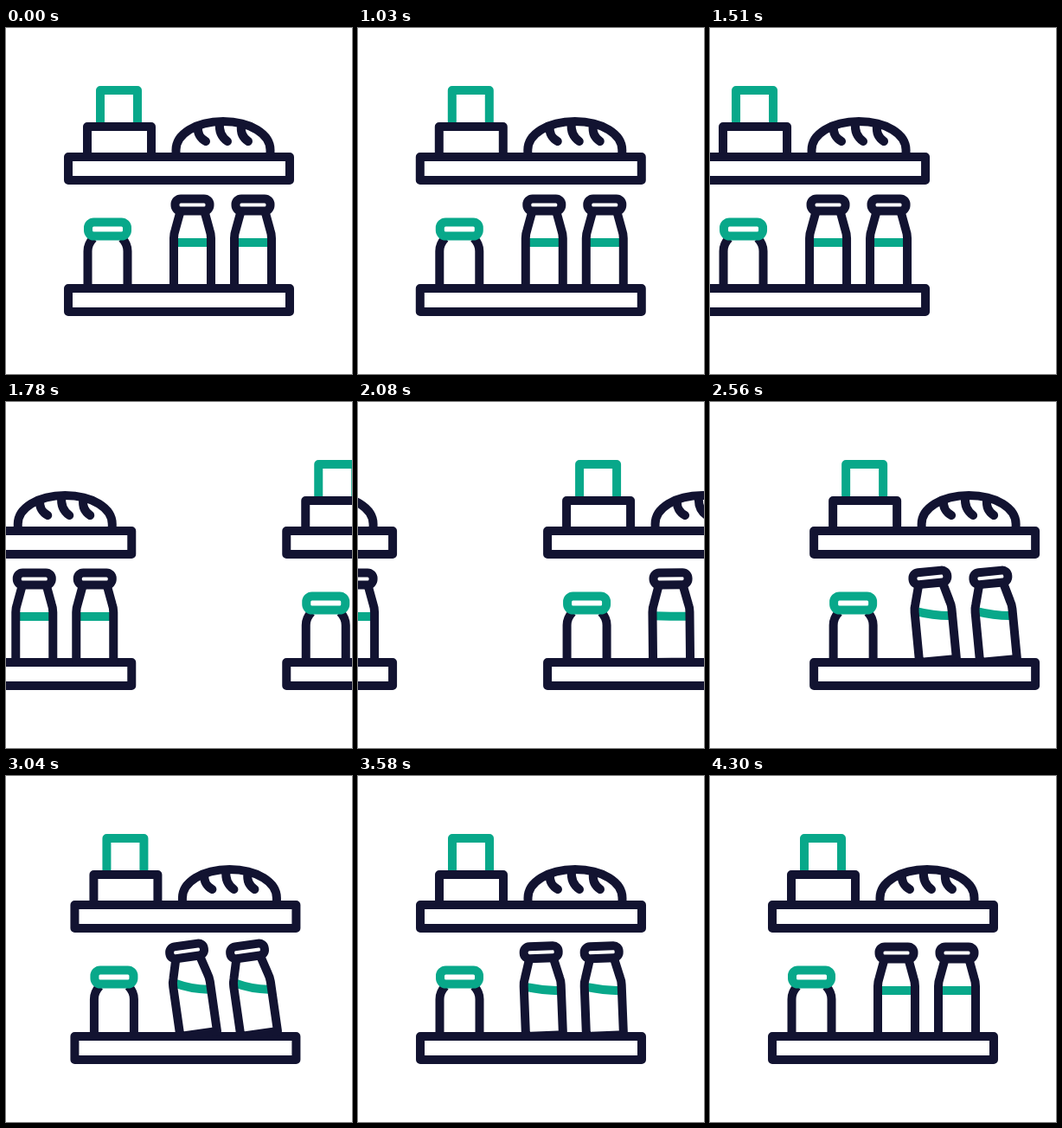
These frames come from a looping animation (400 by 400 pixels, 4.36 s). An HTML page:

```html
<!DOCTYPE html>
<html lang="en">
<head>
<meta charset="utf-8">
<title>Shelf</title>
<style>
  html, body { margin: 0; width: 100%; height: 100%; overflow: hidden; background: #fff; }
  svg { display: block; width: 100%; height: 100%; }
</style>
</head>
<body>
<svg viewBox="0 0 400 400" fill="none" stroke="#121331" stroke-width="10" stroke-linejoin="round">
  <defs>
    <g id="goods">
      <path d="M109 109V72H152V109" stroke="#08a88a"/>
      <path d="M94 149V114H168V149"/>
      <path d="M196.5 149V141C196.5 123 219 108 251 108S305.500 123 305.500 141V149"/>
      <path d="M222 114C221 122 225 128 231 131M247 110C246 119 249 126 256 131M272 113C271 121 274 127 280 131" stroke-linecap="round"/>
      <rect x="72" y="149" width="256" height="27"/>
      <path d="M101 243C97 247 94.500 252 94.500 258V301M134 243C138 247 140.500 252 140.500 258V301"/>
      <rect x="95" y="224.500" width="45" height="16" rx="6.500" stroke="#08a88a"/>
      <rect x="72" y="301" width="256" height="27"/>
    </g>
    <g id="glass">
      <path d="M201 214L195.500 234Q194 238 194 243V301H237V243Q237 238 235.500 234L230 214"/>
      <rect x="195.500" y="197.500" width="40" height="14" rx="6.500"/>
    </g>
  </defs>
</svg>
<script>
const svg = document.querySelector('svg');
const LOOP = 4360, START = 1030, STEP = 30, SPAN = 435;

function add(parent, tag, attrs = {}) {
  const el = document.createElementNS('http://www.w3.org/2000/svg', tag);
  for (const k in attrs) el.setAttribute(k, attrs[k]);
  return parent.appendChild(el);
}

function makeShelf() {
  const root = add(svg, 'g');
  add(root, 'use', { href: '#goods' });
  const bottles = [0, 70].map(dx => {
    const body = add(add(root, 'g', { transform: `translate(${dx})` }), 'g');
    const milk = add(body, 'path', { stroke: '#08a88a' });
    add(body, 'use', { href: '#glass' });
    return { body, milk };
  });
  return { root, bottles };
}

function pose({ root, bottles }, x, angle, slosh) {
  root.setAttribute('transform', `translate(${x.toFixed(3)})`);
  const left = 248 - 9 * slosh, right = 248 + 4 * slosh, mid = 248 + 1.5 * slosh;
  for (const { body, milk } of bottles) {
    body.setAttribute('transform', `rotate(${-angle} 194 301)`);
    milk.setAttribute('d', `M196 ${left}Q215.500 ${mid} 235 ${right}`);
  }
}

// Eased progress from a to b, with flat ends and handle positions x1, x2
function ease(t, a, b, x1, x2) {
  const x = Math.min(1, Math.max(0, (t - a) / (b - a)));
  if (x === 0 || x === 1) return x;
  let lo = 0, hi = 1;
  for (let i = 0; i < 30; i++) {
    const s = (lo + hi) / 2, r = 1 - s;
    if (3 * r * r * s * x1 + 3 * r * s * s * x2 + s * s * s < x) lo = s; else hi = s;
  }
  return lo * lo * (3 - 2 * lo);
}

const leaving = makeShelf(), arriving = makeShelf();

function draw(time) {
  const now = time % LOOP;
  const t = now < START ? 0 : START + Math.floor((now - START) / STEP) * STEP;
  const p = ease(t, 1000, 3400, 0.333, 0.3);
  const lean = ease(t, 1900, 2980, 0.333, 0.667);
  const tilt = lean - ease(t, 2980, 4200, 0.333, 0.3);
  const slosh = lean - ease(t, 2980, 4330, 0.333, 0.45);
  pose(leaving, -SPAN * p, 0, 0);
  pose(arriving, SPAN * (1 - p), 8.2 * tilt, slosh);
}

const t0 = performance.now();
function tick() {
  draw(performance.now() - t0);
  requestAnimationFrame(tick);
}
tick();
</script>
</body>
</html>
```
